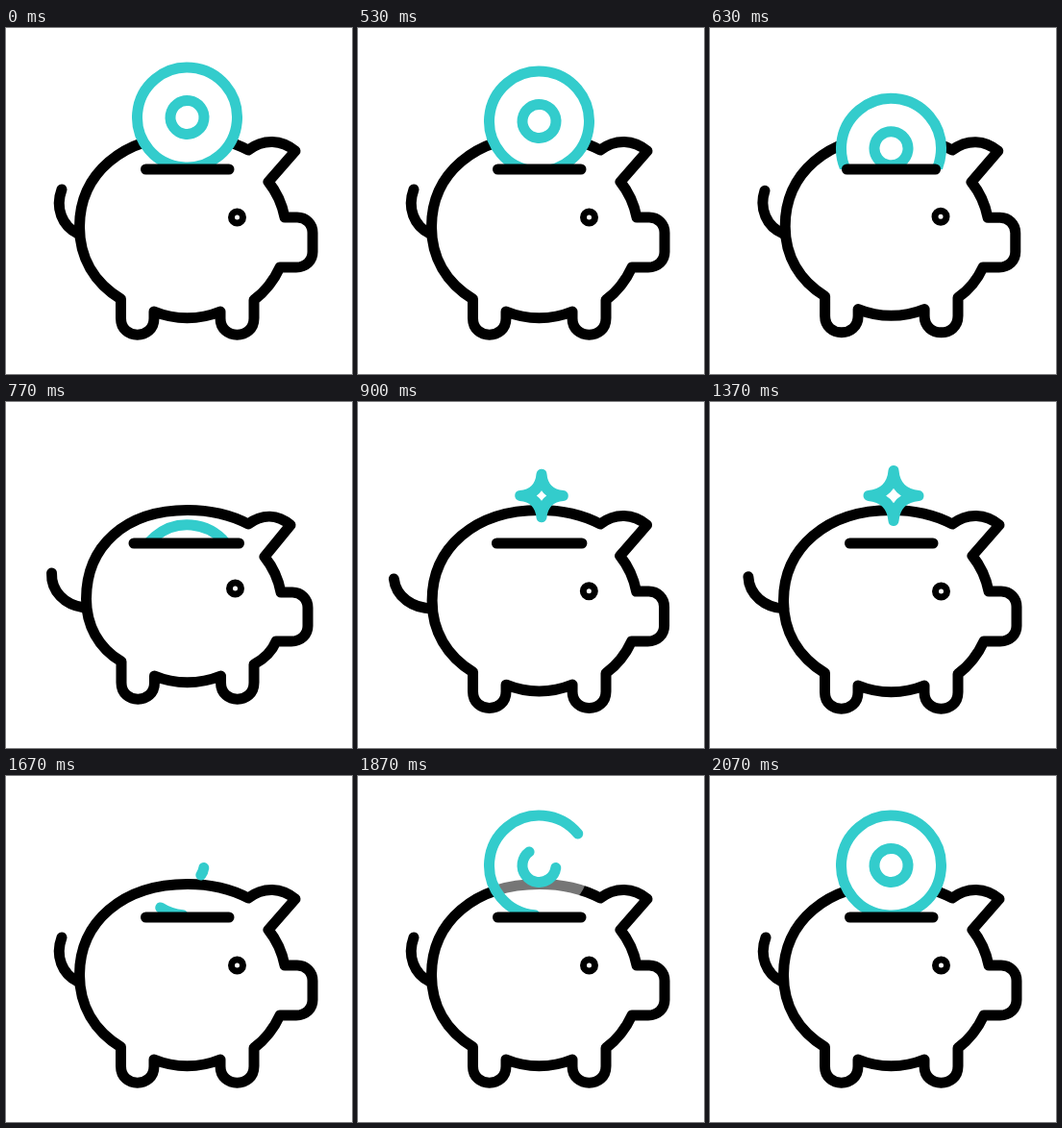
An HTML page that plays this animation: 360x360 px, repeating every 2500 ms.

```html
<!DOCTYPE html>
<html>
<head>
<meta charset="utf-8">
<title>Piggy bank</title>
<style>
html, body { margin: 0; height: 100%; overflow: hidden; background: #fff; }
svg { display: block; width: 100vw; height: 100vh; fill: none; stroke: #000; stroke-width: 11; stroke-linecap: round; stroke-linejoin: round; }
.teal { stroke: #33cccc; }
</style>
</head>
<body>
<svg viewBox="0 0 360 360">
  <clipPath id="above"><path d="M0 0H360V147H0Z"/></clipPath>
  <path id="tail"/>
  <path id="body"/>
  <circle id="eye" r="6" stroke-width="7"/>
  <g clip-path="url(#above)">
    <g id="coin" class="teal">
      <circle id="disc" r="52" fill="#fff" stroke="none"/>
      <circle class="ring" r="52" pathLength="360" transform="rotate(95)"/>
      <circle class="ring" r="17.5" pathLength="360" transform="rotate(8)"/>
    </g>
  </g>
  <path id="slot"/>
  <path id="spark" class="teal" vector-effect="non-scaling-stroke" d="M0-26Q2-2 26 0Q2 2 0 26Q-2 2-26 0Q-2-2 0-26Z"/>
</svg>
<script>
const LOOP = 2500;
const $ = id => document.getElementById(id);
const set = (el, attrs) => { for (const k in attrs) el.setAttribute(k, attrs[k]); };
const ramp = (t, a, b) => Math.min(1, Math.max(0, (t - a) / (b - a)));
const ease = (t, a, b) => { const u = ramp(t, a, b); return u * u * (3 - 2 * u); };
const lerp = (a, b, u) => a + (b - a) * u;

// Blend two paths that share the same commands.
const NUM = /-?[\d.]+/g;
function blend(from, to, u) {
  const ends = to.match(NUM);
  let i = 0;
  return from.replace(NUM, n => lerp(+n, +ends[i++], u).toFixed(2));
}

const BODY = `M252 127 C233 117 211 112.5 189 112.5 C121 112.5 76.5 152 76.5 207 C76.5 239 92 265 119.5 282
  L119.5 302 C119.5 325 154 325 154 302 L154 295 C176 304 201 304 223 295
  L223 302 C223 325 258 325 258 302 L258 283 C270 274 279 262 285 249
  L302 249 C312 249 319 242 319 233 L319 213 C319 204 312 197 303 197 L290 197
  C287 182 281 170 273 160 L301 128 C287 116 268 115 252 127 Z`;
const SQUASHED = `M252 127 C233 117 211 112.5 189 112.5 C124 112.5 83.5 150 83.5 205 C83.5 232 96 256 120 270
  L120 292 C120 315 154.5 315 154.5 292 L154.5 285 C176 294 201 294 223.5 285
  L223.5 292 C223.5 315 258 315 258 292 L258 273 C269 267 277 259 281 249
  L297 249 C307 249 314 242 314 233 L314 214 C314 205 307 198 298 198 L286 198
  C283 182 277 171 269 161 L296 128 C283 117 267 116 252 127 Z`;
const TAIL_UP = 'M75 214 C58 206 51 187 58 168';
const TAIL_OUT = 'M77 215 C57 215 39 203 37 184';

function draw(t) {
  const squash = ease(t, 570, 760) - ease(t, 770, 930);
  set($('body'), { d: blend(BODY, SQUASHED, squash) });
  set($('slot'), { d: blend('M145.5 147 L232 147', 'M133 147 L242.5 147', squash) });
  set($('eye'), { cx: 240.5 - 2 * squash, cy: 197 - 3 * squash });

  const swing = ease(t, 570, 890) - ease(t, 1320, 1540);
  set($('tail'), {
    d: blend(TAIL_UP, TAIL_OUT, swing),
    transform: `translate(${4 * squash} ${-squash})`
  });

  // The coin drops through the slot, then its rings are drawn anew.
  const drawn = t < 1200 ? 1 : ease(t, 1590, 2070);
  const y = t < 1200 ? 93 + 112 * ease(t, 484, 898) : 93;
  set($('coin'), { transform: `translate(188.5 ${y})`, visibility: drawn > 0 ? 'visible' : 'hidden' });
  set($('disc'), { opacity: t < 1200 ? 1 : ease(t, 1690, 2070) });
  for (const ring of document.querySelectorAll('.ring'))
    set(ring, { 'stroke-dasharray': drawn < 1 ? `${360 * drawn} 400` : 'none' });

  const size = 1 - (1 - ramp(t, 832, 976)) ** 3 - ease(t, 1400, 1600);
  set($('spark'), {
    transform: `translate(191 97.5) scale(${size})`,
    visibility: size > 0.01 ? 'visible' : 'hidden'
  });
}

const start = performance.now();
function tick() {
  draw((performance.now() - start) % LOOP);
  requestAnimationFrame(tick);
}
tick();
</script>
</body>
</html>
```
